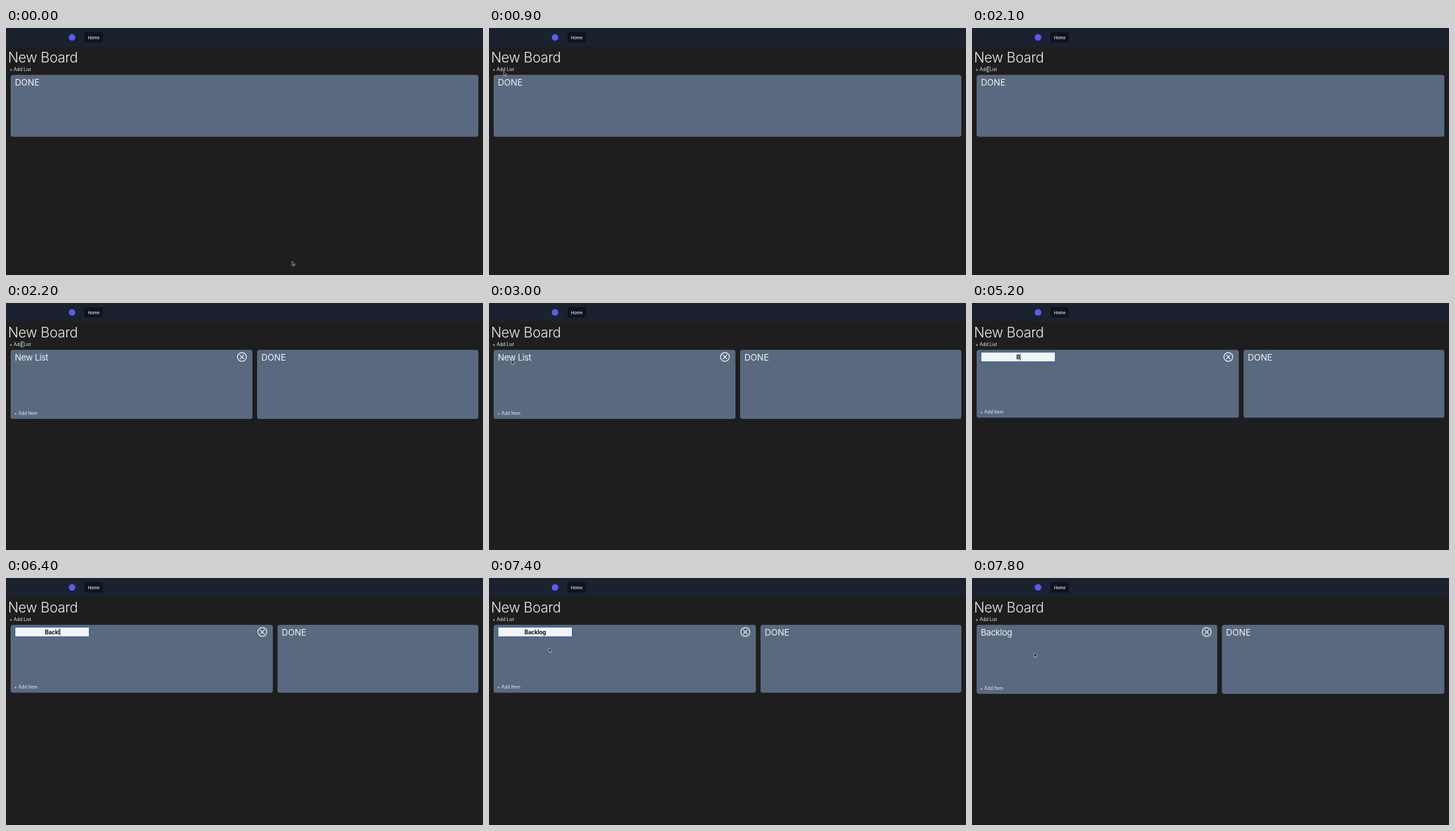
Recreate the animation shown at these times as an HTML page. Size 720 px wide and 373 px high, loop 8 s.

```html
<!DOCTYPE html>
<html lang="en">
<head>
<meta charset="utf-8">
<title>Board</title>
<style>
  html, body { margin: 0; width: 100%; height: 100%; overflow: hidden; background: #1e1e1e; }
  svg { display: block; width: 720px; height: 373px; }
  text { font-family: Inter, Roboto, "Liberation Sans", sans-serif; fill: #f1f2f4; white-space: pre; }
  .card { fill: #59697f; }
  .title { font-size: 21px; font-weight: 300; letter-spacing: -.35px; fill: #ececec; }
  .head { font-size: 13.1px; }
  .name { letter-spacing: -.38px; }
  .small { font-size: 7px; letter-spacing: -.08px; fill: #e6e7e9; }
  .home { font-size: 6.1px; font-weight: 500; }
  .edit { font-size: 8.5px; font-weight: 700; letter-spacing: -.1px; fill: #0c0c0c; text-anchor: middle; }
  .close { fill: none; stroke: #f4f5f7; stroke-width: 1.2; stroke-linecap: round; }
</style>
</head>
<body>
<svg viewBox="0 0 720 373">
  <rect width="720" height="373" fill="#1e1e1e"/>
  <rect width="720" height="28" fill="#1a222f"/>
  <circle cx="99.7" cy="14.2" r="5" fill="#595cf0"/>
  <rect x="118.5" y="6.3" width="27.7" height="15.7" rx="2.7" fill="#0f131d"/>
  <text class="home" x="123.8" y="16.6">Home</text>
  <text class="title" x="3" y="52.4">New Board</text>
  <text class="small" x="5" y="64.6">+ Add List</text>

  <rect id="doneCard" class="card" y="70.8" rx="3.5"/>
  <text id="doneText" class="head" y="87.4">DONE</text>

  <g id="list">
    <rect id="listCard" class="card" x="7" y="70.8" rx="3.5"/>
    <text id="name" class="head name" x="13.3" y="87.4"></text>
    <g id="close" class="close">
      <circle r="6.7"/>
      <path d="M-2.8-2.8 2.8 2.8M2.8-2.8-2.8 2.8"/>
    </g>
    <text id="addItem" class="small" x="12">+ Add Item</text>
    <g id="field">
      <rect x="14" y="74.5" width="111.4" height="14" fill="#f3f4f6"/>
      <rect id="ring" x="13.6" y="74.1" width="112.2" height="14.8" rx="1" fill="none" stroke="#2462ac" stroke-width="1"/>
      <rect id="mark" y="76.2" height="11" fill="#a9cdf8"/>
      <text id="edit" class="edit" x="69.8" y="84.8"></text>
      <rect id="caret" y="76.3" width=".8" height="10.6" fill="#111"/>
    </g>
  </g>

  <path id="arrow" d="M0 0V6.6L1.6 5.2 2.6 7.5 3.7 7 2.7 4.8H4.7Z" fill="#111" stroke="#eee" stroke-width=".6" stroke-linejoin="round"/>
  <g id="beam" fill="none" stroke-linecap="round">
    <path d="M-1.5-3.7Q0-3.7 0-2.7V2.7Q0 3.7-1.5 3.7M1.5-3.7Q0-3.7 0-2.7M0 2.7Q0 3.7 1.5 3.7" stroke="#eee" stroke-width="1.6"/>
    <path d="M-1.5-3.7Q0-3.7 0-2.7V2.7Q0 3.7-1.5 3.7M1.5-3.7Q0-3.7 0-2.7M0 2.7Q0 3.7 1.5 3.7" stroke="#111" stroke-width=".8"/>
  </g>
</svg>
<script>
const LOOP = 8000, STEP = 100;
const ADDED = 2200, OPENED = 3100, FOCUSED = 4200, SAVED = 7700;
const $ = id => document.getElementById(id);
const set = (id, attrs) => { for (const k in attrs) $(id).setAttribute(k, attrs[k]); };
const show = (id, on) => { $(id).style.display = on ? '' : 'none'; };
const latest = (rows, t) => rows.filter(r => r[0] <= t).pop();

// start, card bottom, right edge of the new list (0: no list yet)
const layouts = [
  [0, 164.3, 0], [ADDED, 175, 372], [OPENED, 173.2, 402.8], [SAVED, 175, 370.2]
];

const typed = [
  [OPENED, 'New List'], [5000, 'B'], [5400, 'Ba'], [5500, 'Bac'],
  [5600, 'Back'], [6400, 'Backl'], [6600, 'Backlo'], [6700, 'Backlog']
];

// move start, move end, from, to, pointer shape
const moves = [
  [0, 600, [431.8, 352.3], [22.6, 72.2], 'arrow'],
  [700, 900, [22.6, 72.2], [22, 65.4], 'arrow'],
  [1100, 1200, [22, 65.4], [24.5, 66.2], 'beam'],
  [2000, 2100, [24.5, 66.2], [24.3, 62.6], 'beam'],
  [2400, 3000, [24.3, 62.6], [34.2, 86], 'arrow'],
  [OPENED, OPENED, [34.5, 87], [34.5, 87], 'beam'],
  [3400, 3900, [34.5, 87], [59.6, 83.3], 'beam'],
  [5000, 5000, [0, 0], [0, 0], ''],
  [7100, 7200, [87.5, 100], [89.2, 103], 'arrow'],
  [7300, 7600, [89.2, 103], [93.7, 113], 'arrow']
];

const ease = p => p * p * (3 - 2 * p);

function drawLists(t) {
  const [, bottom, right] = latest(layouts, t);
  const left = right ? right + 7 : 7;
  const height = bottom - 70.8;
  set('doneCard', { x: left, width: 713 - left, height });
  set('doneText', { x: left + 6.4 });
  show('list', right);
  if (!right) return;
  set('listCard', { width: right - 7, height });
  set('close', { transform: `translate(${right - 15.9} 81.5)` });
  set('addItem', { y: bottom - 6 });
  $('name').textContent = t < OPENED ? 'New List' : t < SAVED ? '' : 'Backlog';
}

function drawField(t) {
  const open = t >= OPENED && t < SAVED;
  show('field', open);
  if (!open) return;
  const [since, word] = latest(typed, t);
  const edit = $('edit');
  edit.textContent = word;
  const width = edit.getComputedTextLength();
  const start = 69.8 - width / 2;
  show('ring', t >= FOCUSED);

  const marked = t >= 4300 && t < 5000;
  show('mark', marked);
  if (marked) {
    set('mark', { x: start, width: t < 4400 ? edit.getSubStringLength(0, 3) : width });
  }
  const blinkOn = (t - since) % 1000 < 500;
  show('caret', t >= 5000 && blinkOn);
  set('caret', { x: start + width });
}

function drawPointer(t) {
  const [from, to, a, b, shape] = latest(moves, t);
  const p = to > from ? ease(Math.min(1, (t - from) / (to - from))) : 1;
  const [x, y] = a.map((v, i) => v + (b[i] - v) * p);
  for (const id of ['arrow', 'beam']) {
    show(id, id === shape);
    set(id, { transform: `translate(${x} ${y})` });
  }
}

const origin = performance.now();
function frame() {
  const now = (performance.now() - origin) % LOOP;
  const t = Math.floor(now / STEP) * STEP;
  drawLists(t);
  drawField(t);
  drawPointer(t);
  requestAnimationFrame(frame);
}
frame();
</script>
</body>
</html>
```
